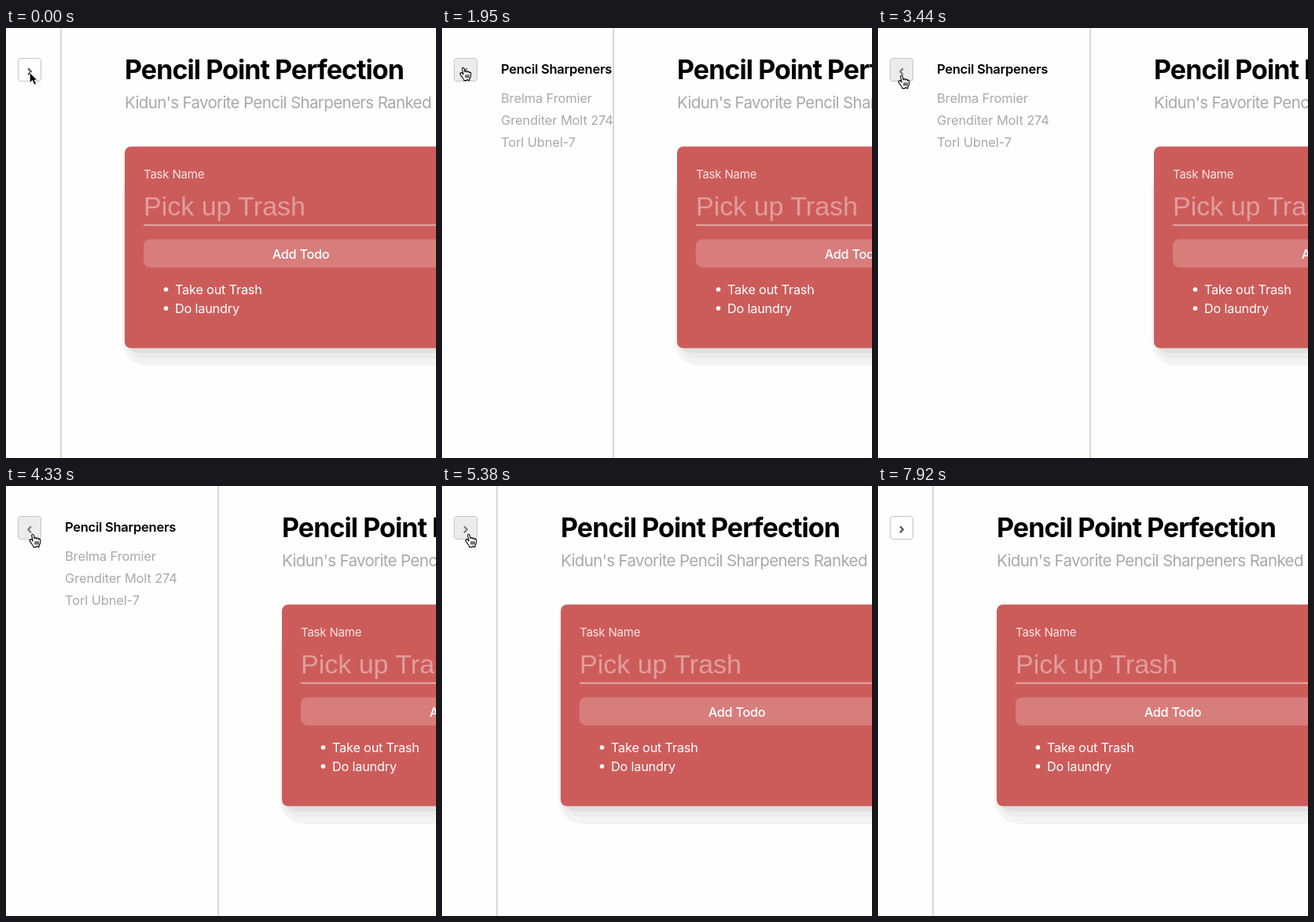
An HTML page that plays this animation: 547x546 px, repeating every 8.06 s.

```html
<!DOCTYPE html>
<html lang="en">
<head>
<meta charset="utf-8">
<title>Sidebar toggle</title>
<style>
  html, body { margin: 0; width: 100%; height: 100%; overflow: hidden; background: #fefefe; }
  svg { display: block; width: 547px; height: 546px; font-family: Inter, "Open Sans", sans-serif; }
  .title { font-size: 34px; font-weight: 700; letter-spacing: -.93px; }
  .sub { font-size: 20.5px; letter-spacing: -.64px; fill: #a9a9a9; }
  .label { font-size: 15px; letter-spacing: -.2px; fill: #f7e3e3; }
  .field { font-family: "Liberation Sans", Arial, sans-serif; font-size: 34px; fill: #fff; fill-opacity: .4; }
  .list { font-size: 16.3px; letter-spacing: -.2px; fill: #fff; }
  .add { font-size: 16.3px; font-weight: 500; letter-spacing: -.3px; fill: #fff; text-anchor: middle; }
  .head { font-size: 16.5px; font-weight: 600; letter-spacing: -.25px; }
  .items { font-size: 16.4px; letter-spacing: -.1px; fill: #a9a9a9; }
</style>
</head>
<body>
<svg viewBox="0 0 547 546">
  <defs>
    <clipPath id="clip"><rect id="clipBox" width="70" height="546"/></clipPath>
  </defs>

  <g clip-path="url(#clip)">
    <text class="head" x="75" y="58">Pencil Sharpeners</text>
    <g class="items">
      <text x="75" y="95">Brelma Fromier</text>
      <text x="75" y="123">Grenditer Molt 274</text>
      <text x="75" y="151">Torl Ubnel-7</text>
    </g>
  </g>

  <rect id="button" x="15.5" y="38.5" width="29" height="29" rx="3.5" stroke="#c6c6c6"/>
  <path id="chevron" fill="none" stroke-width="2.2"/>

  <g id="page">
    <rect x="69" width="2" height="546" fill="#d8d8d8"/>
    <text class="title" x="151" y="65">Pencil Point Perfection</text>
    <text class="sub" x="151" y="102">Kidun's Favorite Pencil Sharpeners Ranked</text>
    <rect x="148" y="176" width="454" height="253" rx="32" fill="#f3f3f3"/>
    <rect x="150" y="176" width="450" height="244" rx="26" fill="#ececec"/>
    <rect x="153" y="176" width="444" height="237" rx="18" fill="#e0e0e0"/>
    <rect x="151" y="150.5" width="448" height="256" rx="8" fill="#cc5c5a"/>
    <text class="label" x="175" y="191">Task Name</text>
    <text class="field" x="175" y="237.5">Pick up Trash</text>
    <rect x="175" y="249.3" width="400" height="2" fill="#fff" fill-opacity=".47"/>
    <rect x="175" y="269" width="400" height="36" rx="8" fill="#b94f4d" fill-opacity=".35"/>
    <rect x="175" y="268.2" width="400" height="36" rx="8" fill="#d77d7b"/>
    <text class="add" x="375" y="293">Add Todo</text>
    <g class="list">
      <circle cx="203.5" cy="332" r="2.8"/>
      <text x="215" y="337.6">Take out Trash</text>
      <circle cx="203.5" cy="356" r="2.8"/>
      <text x="215" y="361.6">Do laundry</text>
    </g>
  </g>

  <g id="arrow">
    <path d="M.7-1.8V14.2L4.1 11L6.2 16.4L9.8 14.9L7.7 9.8H12.3Z" transform="translate(-.7 -.6)" fill="#fff" stroke="#000" stroke-opacity=".12" stroke-width=".8"/>
    <path d="M0 0V11.2L3 8.3L5.4 14L7.3 13.2L4.9 8.2H8.2Z"/>
  </g>
  <g id="hand" stroke="#000" stroke-width="1.1" stroke-linejoin="round" stroke-linecap="round">
    <path fill="#fff" d="M11.3 20.4C10.5 19 9.6 17.8 8.7 16.6C7.9 15.2 9.9 13.4 11.3 15.1L12.6 16.6C12.3 14.2 11.7 12.2 11.2 9.8C10.9 7.5 13.1 7.3 13.7 9.2L14.7 13.6C14.9 12 17.1 11.8 17.3 13.4V14C17.5 12.4 19.7 12.4 20 14V14.8C20.4 13.4 22.3 13.6 22.3 15.2C22.4 17.5 22.3 19.2 21.5 20.6C20.5 22 20.2 22.5 20.4 24.3C18.8 24.6 18.6 24 18 23C17.6 22.5 17.4 24.3 16.4 24.3H13.4C13.6 22.6 12.5 22 11.3 20.4Z"/>
    <path fill="none" d="M15.6 17.3V20.7M17.6 17.2V20.7M19.6 17.2V20.7"/>
  </g>
</svg>

<script>
const LOOP = 8060;
const el = id => document.getElementById(id);

// Each track lists [start time, ...values], held until the next entry.
const cursor = [
  [0, "arrow", 29, 57],
  [1200, "hand", 27, 59],
  [1350, "hand", 22, 50],
  [3440, "hand", 25, 60],
  [3590, "hand", 28, 74],
  [3740, "arrow", 31, 80],
  [4030, "arrow", 31, 79],
  [4180, "hand", 30, 62],
  [4330, "hand", 29, 61],
  [7170, "arrow", 67, 102],
  [7320, "arrow", 338, 454],
  [7470, "arrow", 376, 476],
  [7620, "arrow", 491, 527],
  [7770, "arrow", 495, 538],
  [7920, "none", 0, 0]
];
const hover = [[0, 0], [1200, .5], [1350, 1], [3740, 0], [4180, .5], [4330, 1], [7320, 0]];
const shift = [[0, 0], [1950, 148], [2090, 198], [2240, 200], [5080, 85], [5230, 1], [5380, 0]];

// Distance from a cursor's box corner to its drawing origin.
const origin = { arrow: [1.7, .6], hand: [-7.5, -7.7] };

const at = (track, t) => track.findLast(step => step[0] <= t).slice(1);
const grey = v => `rgb(${v},${v},${v})`;

function draw(t) {
  const [dx] = at(shift, t);
  el("page").setAttribute("transform", `translate(${dx} 0)`);
  el("clipBox").setAttribute("width", 70 + dx);

  const [h] = at(hover, t);
  const open = t >= 1950 && t < 5080;
  el("button").setAttribute("fill", grey(254 - 18 * h));
  el("chevron").setAttribute("stroke", grey(85 + 40 * h));
  el("chevron").setAttribute("d", open ? "M31.9 51.2L28.2 55.2L31.9 59.2" : "M28.1 51.2L31.8 55.2L28.1 59.2");

  const [kind, x, y] = at(cursor, t);
  for (const id in origin) {
    const [ox, oy] = origin[id];
    el(id).style.display = id === kind ? "" : "none";
    el(id).setAttribute("transform", `translate(${x + ox} ${y + oy})`);
  }
}

const start = performance.now();
function tick() {
  draw((performance.now() - start) % LOOP);
  requestAnimationFrame(tick);
}
tick();
</script>
</body>
</html>
```
